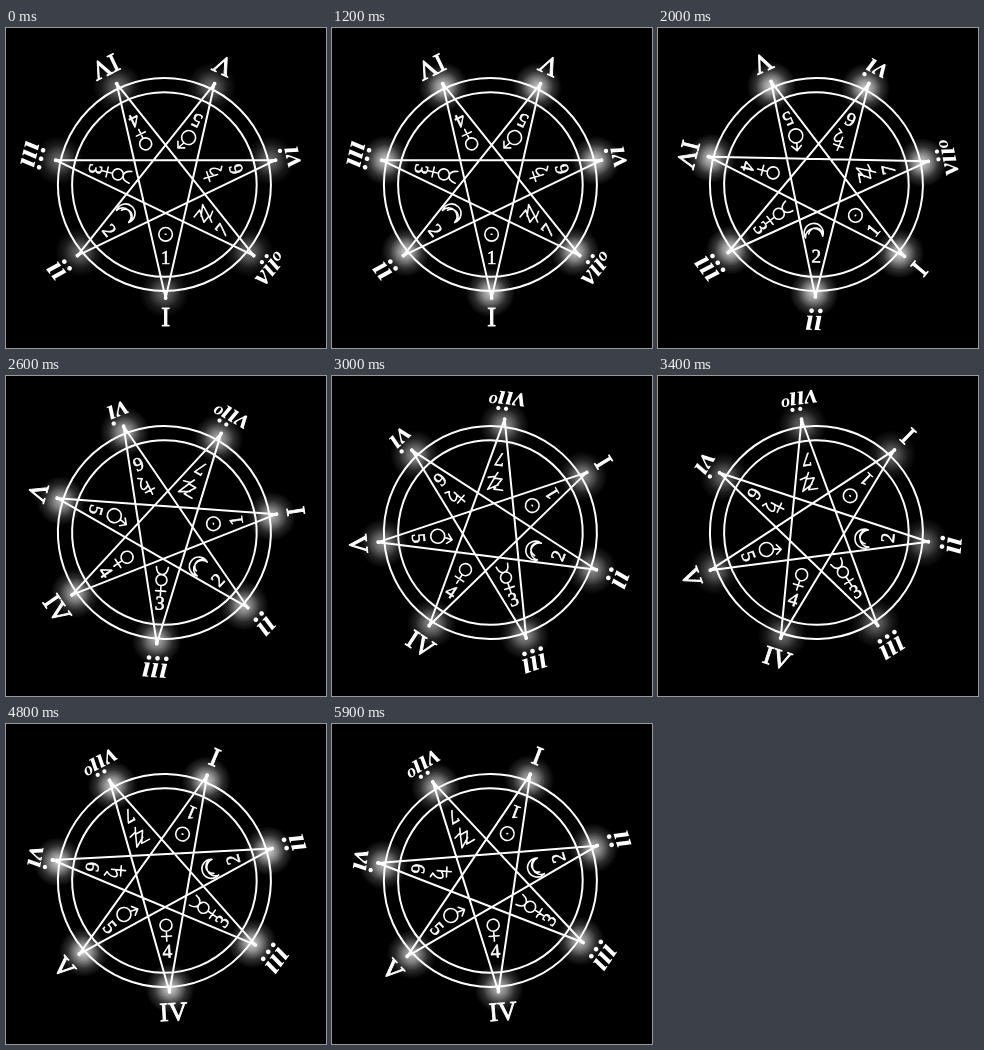
Animation, 320 px wide and 320 px high, one loop 6 s. Source, as an HTML page:

```html
<!DOCTYPE html>
<html lang="en">
<head>
<meta charset="utf-8">
<title>Turning heptagram</title>
<style>
  html, body { margin: 0; width: 100%; height: 100%; overflow: hidden; background: #000; }
  svg { display: block; width: 100vw; height: 100vh; }
  .line { fill: none; stroke: #fff; stroke-width: 2; stroke-linecap: round; stroke-linejoin: round; }
  .sign { stroke-width: 1.6; }
  .tip { stroke-width: 3; }
  text { fill: #fff; stroke: #fff; stroke-width: .9; text-anchor: middle; font-family: "Liberation Serif", "Times New Roman", serif; }
  .low { font-style: italic; font-weight: bold; stroke-width: 0; }
  .num { font-size: 19.5px; stroke-width: .6; }
</style>
</head>
<body>
<svg viewBox="0 0 320 320">
  <defs>
    <radialGradient id="glow">
      <stop offset="0" stop-color="#fff" stop-opacity=".85"/>
      <stop offset=".3" stop-color="#fff" stop-opacity=".6"/>
      <stop offset=".65" stop-color="#fff" stop-opacity=".2"/>
      <stop offset="1" stop-color="#fff" stop-opacity="0"/>
    </radialGradient>
  </defs>
  <g id="wheel">
    <g id="glows"></g>
    <circle class="line" r="106.5"/>
    <circle class="line" r="92.3"/>
    <g id="star" transform="translate(1.2 .8)"></g>
  </g>
</svg>
<script>
const LOOP = 6000, STEP = 100, PULSE = 3400, TIP = 112.8, HALO = 108, SLICE = 360 / 7;
const $ = id => document.getElementById(id);

const ring = (r, y = 0) => `M${-r} ${y}a${r} ${r} 0 1 1 ${2 * r} 0a${r} ${r} 0 1 1 ${-2 * r} 0`;

// label, font size, baseline radius, x shift, extra class, planet sign
const points = [
  ['I', 26.5, 141, 0, '', ring(6.8) + 'M-.4 0H.4'],
  ['ii', 31, 146, -1, 'low', 'M-11 5A9.5 9.5 0 1 1 6 3A8 8 0 0 0 -11 5M-8 1A7 7 0 0 1 6 3'],
  ['iii', 31, 146.5, 0, 'low', ring(5.5) + 'M-6 -13Q-5 -5.5 0 -5.5T6 -13M0 5.5V16M-5 11H5'],
  ['IV', 26.5, 141.5, 3, '', ring(6, -3) + 'M0 3V13M-5 8H5'],
  ['V', 26.5, 141.5, 0, '', ring(7, 4) + 'M2 -3L5 -10M-1 -7L5 -10L8 -4'],
  ['vi', 29, 137, 0, 'low', 'M-2 -10L-1 4M-6 -5L4 -6M-1 0Q5 -5 6 0Q6 5 2 8L6 10'],
  ['vii', 28, 140.5, -4, 'low', 'M-7 -7H2L-5 4H3L0 10M-2 -2L8 -8L2 6L9 4']
];

const spot = (i, r) => {
  const a = i * SLICE * Math.PI / 180;
  return [-r * Math.sin(a), r * Math.cos(a)].map(v => v.toFixed(2));
};

let web = 'M' + spot(0, TIP), signs = '', halos = '';
for (let k = 1; k < 7; k++) web += 'L' + spot(k * 3 % 7, TIP);

points.forEach(([label, size, base, dx, kind, sign], i) => {
  const [x, y] = spot(i, HALO);
  halos += `<circle cx="${x}" cy="${y}" r="25" fill="url(#glow)"/>`;
  signs += `<g transform="rotate(${i * SLICE})">
    <path class="line tip" d="M0 ${TIP - 5}V${TIP}"/>
    <circle cy="${TIP}" r="1.9" fill="#fff"/>
    <path class="line sign" transform="translate(0 49)" d="${sign}"/>
    <text class="num" y="78.5">${i + 1}</text>
    <text class="${kind}" x="${dx}" y="${base}" font-size="${size}">${label}</text>
    ${i === 6 ? `<text class="low" x="14" y="${base - 5}" font-size="18">o</text>` : ''}
  </g>`;
});
$('star').innerHTML = `<path class="line" d="${web}Z"/>` + signs;
$('glows').innerHTML = halos;

// time ms, angle deg, speed deg/s
const spin = [
  [1200, 0, 0], [2000, 50.2, 82], [2600, 98.7, 69],
  [3400, 136, 29], [4200, 152.4, 12], [5600, 158.8, 0]
];

function angleAt(t) {
  if (t <= spin[0][0]) return 0;
  const n = spin.findIndex(k => k[0] > t);
  if (n < 0) return spin[spin.length - 1][1];
  const [t0, a, va] = spin[n - 1], [t1, b, vb] = spin[n];
  const h = (t1 - t0) / 1000, u = (t - t0) / (t1 - t0), w = 1 - u;
  return a * w * w * (1 + 2 * u) + b * u * u * (3 - 2 * u) + h * u * w * (va * w - vb * u);
}

function draw() {
  const t = Math.floor(performance.now() % LOOP / STEP) * STEP;
  $('wheel').setAttribute('transform', `translate(158.4 156.5) rotate(${-angleAt(t)})`);
  $('glows').setAttribute('opacity', .5 + .48 * Math.abs(Math.sin(Math.PI * t / PULSE)));
  requestAnimationFrame(draw);
}
draw();
</script>
</body>
</html>
```
